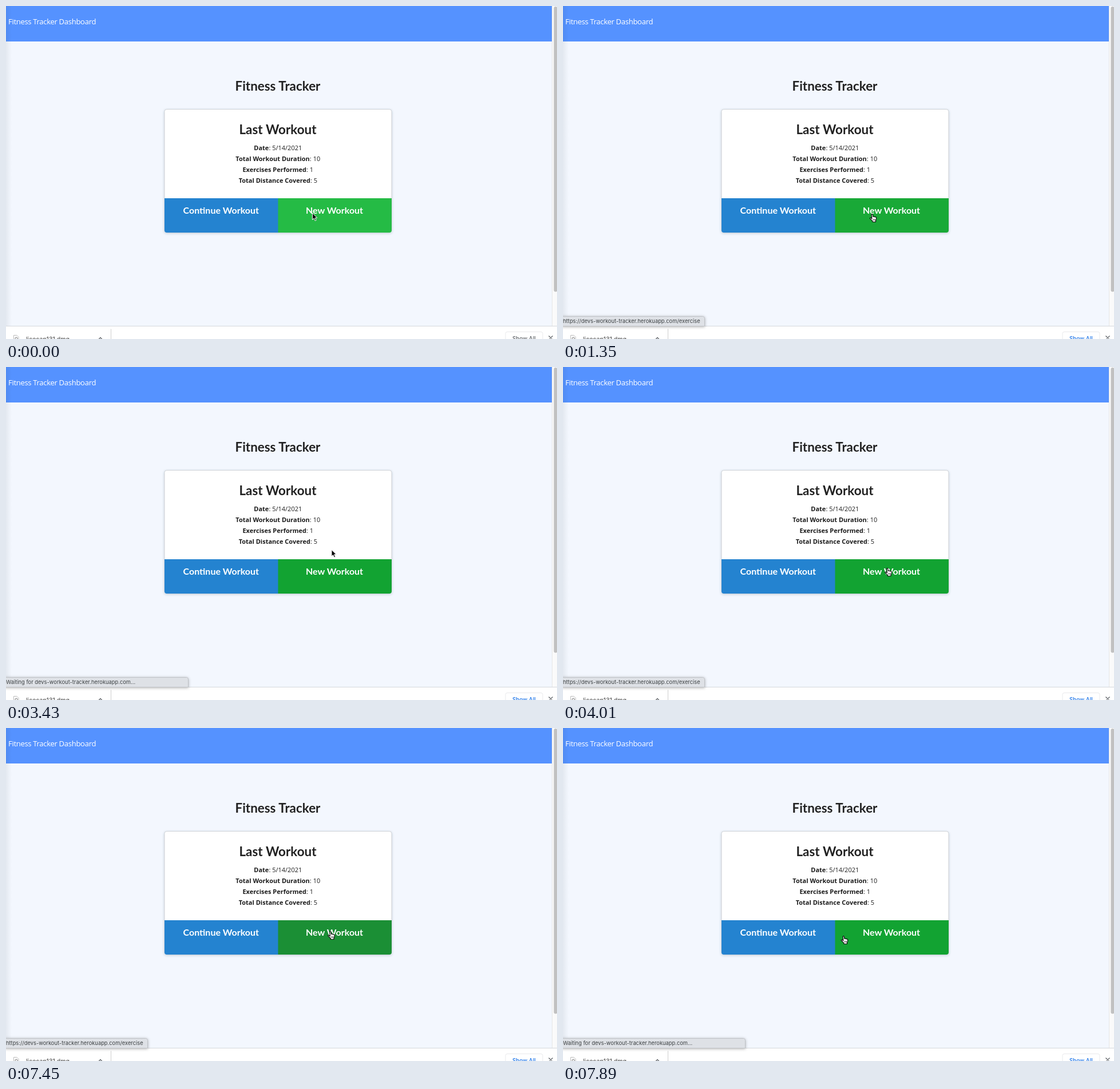
These frames come from a looping animation (963 px wide and 582 px high, 8000 ms). An HTML page:

```html
<!DOCTYPE html>
<html lang="en">
<head>
<meta charset="utf-8">
<title>Fitness Tracker</title>
<style>
  html, body { margin: 0; width: 100%; height: 100%; overflow: hidden; background: #f3f7fe; }
  svg { display: block; width: 963px; height: 582px; }
  text { white-space: pre; }
  .nav { font: 13.1px "Open Sans", sans-serif; letter-spacing: -.025em; fill: #fff; }
  .title { font: 700 22.4px Lato, sans-serif; fill: #212121; text-anchor: middle; }
  .stat { font: 11px "Open Sans", sans-serif; fill: #1c1c1c; text-anchor: middle; }
  .stat tspan { font-weight: 700; }
  .button { font: 700 16px Lato, sans-serif; fill: #fff; text-anchor: middle; }
  .status { font: 9.35px Inter, sans-serif; fill: #3c4043; }
  .file { font: 10.6px Inter, sans-serif; fill: #444; }
  .show { font: 500 9.8px Inter, sans-serif; }
</style>
</head>
<body>
<svg viewBox="0 0 963 582">
  <defs>
    <linearGradient id="edge">
      <stop stop-color="#234" stop-opacity=".07"/>
      <stop offset="1" stop-color="#234" stop-opacity="0"/>
    </linearGradient>
    <filter id="cardShadow" x="-10%" y="-10%" width="120%" height="120%">
      <feDropShadow dx="0" dy="1" stdDeviation="2" flood-color="#345" flood-opacity=".3"/>
    </filter>
    <filter id="bubbleShadow" x="-10%" y="-50%" width="120%" height="250%">
      <feDropShadow dx="0" dy="1" stdDeviation="2.5" flood-opacity=".3"/>
    </filter>
    <clipPath id="cardClip"><rect x="277" y="181" width="397" height="215" rx="4"/></clipPath>
  </defs>

  <rect width="963" height="582" fill="#f3f7fe"/>
  <rect width="955" height="62" fill="#5592ff"/>
  <rect width="10" height="560" fill="url(#edge)"/>
  <text class="nav" x="4" y="32">Fitness Tracker Dashboard</text>
  <path d="M954 0h9v560h-9z" fill="#fafafa"/>
  <path d="M954.5 0v560" stroke="#e6e6e6"/>
  <rect x="957.5" y="1" width="6" height="498.500" rx="3" fill="#c1c1c1"/>

  <text class="title" x="475" y="148">Fitness Tracker</text>
  <rect x="277" y="181" width="397" height="215" rx="4" fill="#fff" filter="url(#cardShadow)"/>
  <rect x="277" y="180.500" width="397" height="215" rx="4" fill="#fff" stroke="#d0d3d8"/>
  <g clip-path="url(#cardClip)">
    <path d="M277 336h199v60h-199z" fill="#2483d0"/>
    <path id="newButton" d="M475.500 336h199v60h-199z"/>
  </g>
  <text class="title" x="475" y="223.500">Last Workout</text>
  <text class="stat" x="475.300" y="252"><tspan>Date</tspan>: 5/14/2021</text>
  <text class="stat" x="475.300" y="271"><tspan>Total Workout Duration</tspan>: 10</text>
  <text class="stat" x="475.300" y="290"><tspan>Exercises Performed</tspan>: 1</text>
  <text class="stat" x="475.300" y="309"><tspan>Total Distance Covered</tspan>: 5</text>
  <text class="button" x="375.800" y="363">Continue Workout</text>
  <text class="button" x="574" y="363">New Workout</text>

  <path d="M0 560h963v22H0z" fill="#fff"/>
  <path d="M0 559.500h963" stroke="#d5d8dc"/>
  <path d="M183.500 564.500v18" stroke="#cfcfcf"/>
  <path d="M13.500 582v-6.500h5.500l3 3v3.500" fill="#fff" stroke="#bbb"/>
  <circle cx="18" cy="581" r="2" fill="none" stroke="#777"/>
  <text class="file" x="35" y="585.500">licecap131.dmg</text>
  <path d="M162 582.500l3-3 3 3M948.500 576.500l7 7m0-7l-7 7" fill="none" stroke="#5f6368" stroke-width="1.300"/>
  <rect x="873" y="569.500" width="65" height="20" rx="3" fill="#fff" stroke="#e9eaec"/>
  <text class="show" id="showAll" x="885" y="584.500">Show All</text>

  <g id="bubble">
    <path id="bubbleBox" fill="#dee1e6" stroke="#bfc2c6" filter="url(#bubbleShadow)"/>
    <text class="status" id="status" x="0" y="554"></text>
  </g>

  <g id="cursor" stroke-linejoin="round">
    <path id="arrow" d="M1 1v11.500l2.700-2.500 1.900 4.300 2-.9-1.900-4.200h3.600z" fill="#000" stroke="#fff"/>
    <path id="beam" d="M1 1q2.500 0 2.500 2v9q0 2-2.500 2M6 1q-2.500 0-2.500 2M6 14q-2.500 0-2.500-2" fill="none" stroke="#222"/>
    <g id="hand">
      <path d="M3.600 1.700c0-1.500 2-1.500 2.200 0l.5 3.700c.4-.9 1.900-.8 2.100.3.500-.8 1.800-.5 2 .4.700-.5 1.800 0 1.800 1.200 0 2.200-.3 3.500-1.200 4.900v2H5.300v-1.600L1.200 8.700C.3 7.400 1.800 6.400 2.900 7.500l1.500 1.300z" fill="#fff" stroke="#000" stroke-width="1.100"/>
      <path d="M6.700 9.200v2.600M8.400 9.200v2.600M10 9.200v2.600" stroke="#000" stroke-width=".7"/>
    </g>
  </g>
</svg>
<script>
const LOOP = 8000;
const host = "devs-workout-tracker.herokuapp.com";
const link = { text: `https://${host}/exercise`, width: 248 };
const waiting = { text: `Waiting for ${host}...`, width: 319 };

// Each track holds [start time, ...value]; values switch without easing.
const cursorTrack = [
  [0, "arrow", 534.5, 361], [900, "arrow", 535.5, 363.5], [1050, "hand", 535.5, 363],
  [2690, "hand", 535.5, 362.5], [2840, "hand", 535, 362],
  [3130, "arrow", 531, 315], [3280, "beam", 538, 292], [3430, "arrow", 568, 318.5],
  [3570, "arrow", 578, 318.5], [3720, "arrow", 576.5, 321],
  [3870, "hand", 562, 350], [4010, "hand", 562, 351], [6560, "hand", 562, 351.7],
  [6710, "hand", 562, 354], [6850, "hand", 562, 355],
  [7740, "hand", 555, 356], [7890, "hand", 485.5, 363]
];
const greenTrack = [
  [0, "#25bb45"], [1050, "#1fb23d"], [1200, "#19a937"], [2390, "#12a332"],
  [7450, "#1b8f35"], [7600, "#12a332"]
];
const bubbleTrack = [
  [0, null, 0], [1200, link, .65], [1350, link, 1], [2390, waiting, 1],
  [3870, link, 1], [7740, waiting, 1]
];

const $ = id => document.getElementById(id);
const valueAt = (track, time) => track.findLast(([start]) => start <= time).slice(1);

function draw(now) {
  const time = now % LOOP;
  const [shape, x, y] = valueAt(cursorTrack, time);
  $("cursor").setAttribute("transform", `translate(${x} ${y})`);
  for (const id of ["arrow", "beam", "hand"]) {
    $(id).style.display = id === shape ? "" : "none";
  }

  $("newButton").style.fill = valueAt(greenTrack, time)[0];
  $("showAll").style.fill = time < 300 ? "#5f6368" : "#1a73e8";

  const [message, opacity] = valueAt(bubbleTrack, time);
  $("bubble").style.opacity = opacity;
  if (message) {
    $("status").textContent = message.text;
    $("bubbleBox").setAttribute("d", `M-2 542.5H${message.width - 3.5}q3 0 3 3V559.5H-2z`);
  }
  requestAnimationFrame(draw);
}
draw(performance.now());
</script>
</body>
</html>
```
